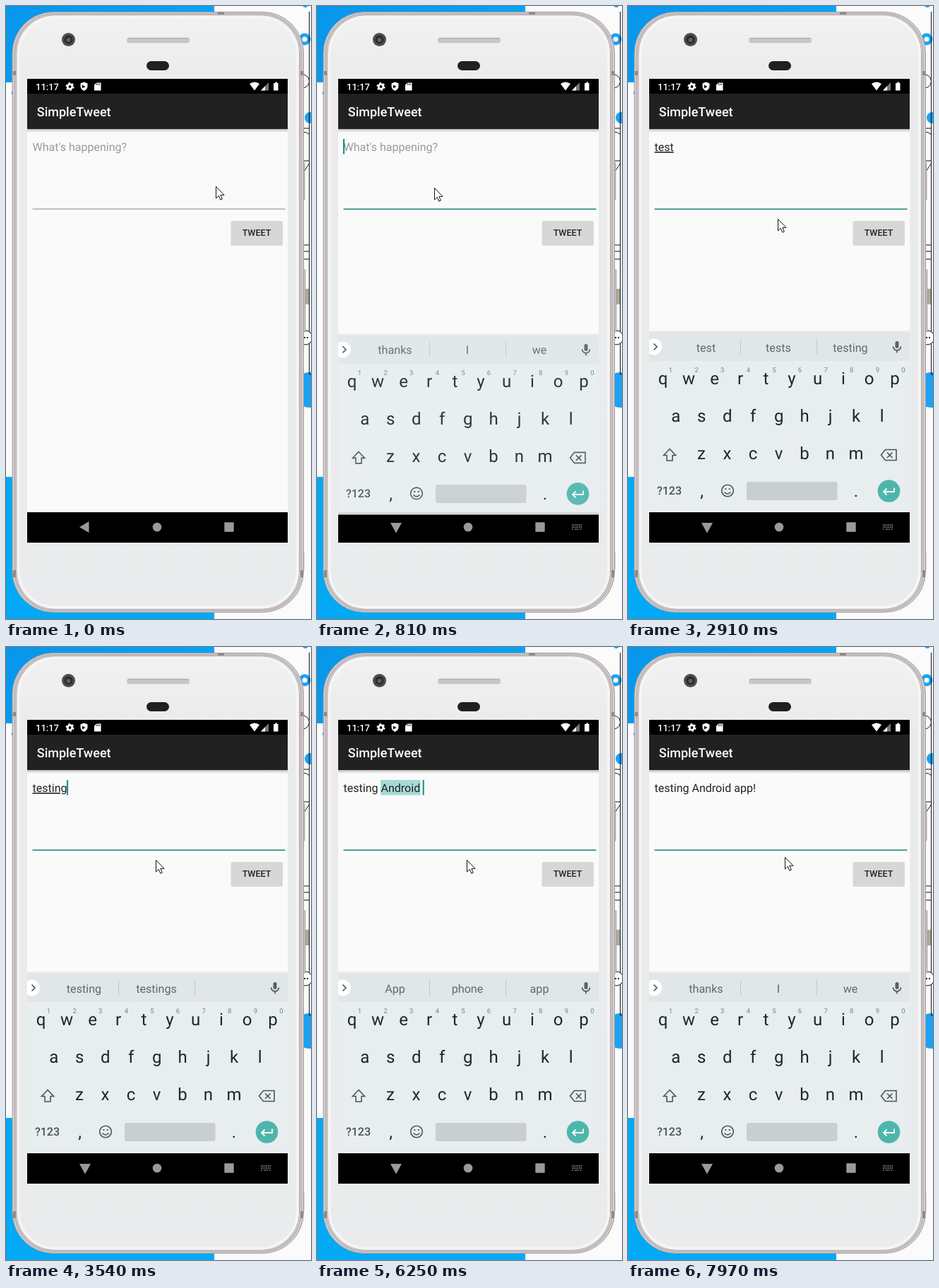
Animation, 432 px wide and 867 px high, one loop 8 s. Source, as an HTML page:

```html
<!DOCTYPE html>
<html lang="en">
<head>
<meta charset="utf-8">
<title>SimpleTweet</title>
<style>
html, body { margin: 0; height: 100%; overflow: hidden; background: #fbfbfb; }
svg { display: block; width: 100vw; height: 100vh; }
text { font-family: Roboto, sans-serif; white-space: pre; text-rendering: geometricPrecision; }
.med { font-weight: 500; }
.mid { text-anchor: middle; }
.key { font-size: 24px; fill: #18282f; }
.num { font-size: 9.5px; fill: #75838a; }
.word { font-size: 16.16px; fill: #5c6a71; }
.line { fill: none; stroke: #4a565c; stroke-width: 1.6; }
#mark { text-decoration: underline; }
</style>
</head>
<body>
<svg viewBox="0 0 432 867">
  <defs>
    <linearGradient id="sky" x2="1" y2=".3"><stop stop-color="#0896ea"/><stop offset="1" stop-color="#03a5f3"/></linearGradient>
    <linearGradient id="face" x2="0" y2="1"><stop stop-color="#f1f1f1"/><stop offset=".12" stop-color="#ebebeb"/><stop offset="1" stop-color="#e9ebec"/></linearGradient>
    <linearGradient id="shade" x2="0" y2="1"><stop stop-color="#bdbdbd"/><stop offset="1" stop-color="#fafafa"/></linearGradient>
    <linearGradient id="slot" x2="0" y2="1"><stop stop-color="#aeaeae"/><stop offset=".4" stop-color="#cbcbcb"/><stop offset="1" stop-color="#c2c2c2"/></linearGradient>
    <clipPath id="screen"><path d="M30 103H399V759H30Z"/></clipPath>
  </defs>

  <!-- desktop behind the phone -->
  <path d="M0 0H432V867H0Z" fill="#fbfbfb"/>
  <path d="M0 0H295V108H0Z" fill="url(#sky)"/>
  <path d="M0 666H295V867H0Z" fill="#03a9f4"/>
  <g fill="#1da1f2">
    <circle cx="10" cy="123" r="2.5"/><circle cx="423" cy="47" r="6" fill="#fff" stroke="#1da1f2" stroke-width="5"/>
    <circle cx="431" cy="158" r="8"/><circle cx="424" cy="-2" r="4"/><circle cx="430" cy="543" r="25"/>
  </g>
  <path d="M424 400H430V422H424Z" fill="#aaa99a"/>
  <path d="M429.500 8V521H432M420 97a9 9 0 0 1 0 19M420 173H430M420 178q6 0 10 4M420 219H430M420 237L430 222M420 338H430M420 347H430M420 358H430" fill="none" stroke="#111"/>
  <circle cx="424" cy="469" r="10" fill="#fff" stroke="#111"/>
  <path d="M422 469h7" stroke="#111" stroke-width="2" stroke-dasharray="2"/>

  <!-- phone body -->
  <path d="M420 222h3v52h-3zM420 373h4v88h-4zM420 772h2v25h-2z" fill="#c9c4c5" stroke="#8f8a8b" stroke-width=".6"/>
  <rect x="9" y="8.500" width="412.500" height="849" rx="58" fill="#d3cdcf" stroke="#a39c9e"/>
  <rect x="12.500" y="11" width="405.500" height="844" rx="56" fill="none" stroke="#b8b0b3" stroke-width="1.500"/>
  <rect x="15" y="13" width="400.500" height="840" rx="54" fill="url(#face)" stroke="#aaa3a5"/>
  <rect x="17.500" y="15.500" width="395.500" height="835" rx="52" fill="none" stroke="#f5f5f5" stroke-width="4"/>
  <path d="M10 92h4v6h-4zM417 92h4v6h-4zM10 798h4v10h-4zM417 798h4v10h-4zM300 9h9v3h-9z" fill="#8f898b"/>
  <circle cx="88.500" cy="47.500" r="9.500" fill="#4d4d4d"/>
  <circle cx="88.500" cy="47.500" r="6" fill="#292b2c"/>
  <circle cx="88.500" cy="48" r="3" fill="#5b6266"/>
  <rect x="171" y="44.800" width="89" height="7.500" rx="3.500" fill="url(#slot)"/>
  <rect x="199" y="78" width="32" height="13" rx="6.500" fill="#1f2022"/>

  <g clip-path="url(#screen)">
    <path d="M30 103H399V759H30Z" fill="#fafafa"/>
    <path d="M30 174H399V179H30Z" fill="url(#shade)"/>
    <path d="M30 103H399V124H30Z"/>
    <path d="M30 124H399V174H30Z" fill="#212121"/>
    <g fill="#fff">
      <text class="med" x="42" y="119" font-size="13">11:17</text>
      <circle cx="90.500" cy="114" r="3.300" fill="none" stroke="#fff" stroke-width="2.800"/>
      <circle cx="90.500" cy="114" r="5.200" fill="none" stroke="#fff" stroke-width="1.600" stroke-dasharray="2.700"/>
      <path d="M110.500 107.500l5 2v4q0 4-5 6.500q-5-2.500-5-6.500v-4zM128.500 108.500h6v11h-9.500v-8zM345 110q7-5 14 0l-7 9.500zM380 109h1.500v-1.500h2.500V109h1.500v10.500H379V109z"/>
      <path d="M372 108v11.500H361z" fill="#777"/><path d="M367 113.300v6.200h-6z"/>
      <text class="med" x="43.800" y="156.200" font-size="18">SimpleTweet</text>
    </g>
    <path d="M108 111.500v5l4.500-2.500z"/>
    <path d="M128.500 109.500v2.500m2-2.500v2.500m2-2.500v2.500" stroke="#000" stroke-width=".8"/>

    <rect id="select" x="90" y="188" height="21.500" fill="#a6dad5"/>
    <text id="ask" x="37.500" y="205" font-size="16.050" fill="#9a9a9a">What's happening?</text>
    <text id="field" x="37.500" y="205" font-size="16.050" fill="#222"><tspan id="done"></tspan><tspan id="mark"></tspan></text>
    <rect id="caret" y="188" width="2" height="21.500" fill="#009688"/>
    <rect id="rule" x="37.500" width="358"/>

    <rect x="318.500" y="304.500" width="73.500" height="34.500" rx="2" fill="#c2c2c2" opacity=".6"/>
    <rect x="319" y="304" width="72.500" height="34" rx="2" fill="#d6d7d7"/>
    <text class="med mid" x="355" y="325" font-size="12.570" fill="#212121">TWEET</text>

    <path d="M30 716H399V759H30Z"/>
    <g fill="#999">
      <path id="back"/>
      <circle cx="214" cy="737" r="6.300"/>
      <rect x="309.300" y="730.300" width="13.400" height="13.400" rx="1"/>
      <path id="ime" d="M361 734h14m-14 3h14m-14 3h2m2 0h6m2 0h2" stroke="#999" stroke-width="1.500" stroke-dasharray="1.500 1"/>
    </g>

    <g id="board">
      <path d="M30 459.500H399V462H30Z" fill="#e9e9e9"/>
      <path d="M30 462H399V502H30Z" fill="#e1e6e8"/>
      <path d="M30 502H399V715.500H30Z" fill="#e8edf0"/>
      <path d="M159.500 471V493M267.500 471V493" stroke="#c1c8cb"/>
      <circle cx="36.500" cy="482" r="11.500" fill="#fff"/>
      <path class="line" d="M36.500 477.500L41 482L36.500 486.500"/>
      <rect x="378.500" y="474" width="5" height="10" rx="2.500" fill="#566268"/>
      <path class="line" d="M375.500 481.500a5.500 5.500 0 0 0 11 0M381 487v3.500"/>
      <g id="words"></g>
      <g id="keys"></g>
      <path class="line" d="M59 626.500L50.500 635.500H55V643H63V635.500H67.500Z"/>
      <path class="line" d="M364.500 627.500H380V642.500H364.500L358.500 635ZM367 631.500L374.500 639M374.500 631.500L367 639"/>
      <text class="med mid" x="58.500" y="691" font-size="16" fill="#46545b">?123</text>
      <circle class="line" cx="141" cy="685.500" r="8.300"/>
      <path class="line" d="M136.500 687.500q4.500 5 9 0M137 683h2.500m3 0h2.500"/>
      <rect x="168" y="673" width="128.500" height="26" rx="3" fill="#c9ced1"/>
      <circle cx="369.500" cy="686" r="15.800" fill="#4db6ac"/>
      <path d="M377 681.500V687H362.500M366.500 682.500L362 687L366.500 691.500" fill="none" stroke="#fff" stroke-width="1.800"/>
    </g>
  </g>
  <path id="mouse" d="M.5.5V17L4.300 13.400L6.800 19.200L9.300 18.100L6.900 12.400H12Z" fill="#fff" stroke="#111"/>
</svg>
<script>
const LOOP = 8000, LEFT = 37.5;
const $ = id => document.getElementById(id);
const set = (el, attrs) => { for (const k in attrs) el.setAttribute(k, attrs[k]); };

function label(parent, cls, x, y, text) {
  const el = document.createElementNS("http://www.w3.org/2000/svg", "text");
  set(el, { class: cls + " mid", x, y });
  el.textContent = text;
  return parent.appendChild(el);
}

const keyRow = (letters, x, y) =>
  [...letters].forEach((c, i) => label($("keys"), "key", x + i * 36.5, y, c));
keyRow("qwertyuiop", 49.5, 535.2);
keyRow("asdfghjkl", 67.7, 587.7);
keyRow("zxcvbnm", 104, 640.9);
keyRow(",", 104.5, 694);
keyRow(".", 323, 694);
[..."1234567890"].forEach((c, i) => label($("keys"), "num", 60.5 + i * 36.6, 518, c));
const words = [110.5, 213, 315].map(x => label($("words"), "word", x, 488.5, ""));

const type = (done, mark, hints) => ({ done, mark, hints, caret: 1, select: 0 });
const on = { caret: 1 }, off = { caret: 0 };
const A = "testing ", B = A + "Android ";

// Each step changes part of the state from its time on.
const steps = [
  [0, { mouse: [297, 255], focus: 0, nav: 0, board: 0, drop: 0, ...type("", "", "thanks|I|we"), ...off }],
  [150, { mouse: [157, 270] }],
  [270, { mouse: [166, 257] }],
  [420, { focus: 1, ...on }],
  [670, { nav: 1 }],
  [810, { board: .92, drop: 3.9 }],
  [930, { board: 1, drop: 0, mouse: [212, 301] }],
  [1070, off],
  [1500, on],
  [2060, type("", "te", "te|the|test")],
  [2310, type("", "test", "test|tests|testing")],
  [2910, off],
  [3170, type("", "testi", "testi|testing|testify")],
  [3420, type("", "testin", "testin|testing|testings")],
  [3540, type("", "testing", "testing|testings|")],
  [3830, type(A, "", "process|the|and")],
  [3980, type(A, "a", "a|and|as")],
  [4130, type(A, "an", "an|and|and I")],
  [4270, type(A, "and", "and|Android|and I")],
  [4840, off],
  [5240, type(A, "andr", "andr|Android|android")],
  [5510, type(A, "andro", "andro|Android|android")],
  [5820, type(A, "androi", "androi|Android|Androids")],
  [5950, type(A, "android", "android|Android|Androids")],
  [6250, { ...type(B, "", "App|phone|app"), select: 1 }],
  [6400, type(B, "a", "a|and|app")],
  [6520, type(B, "ap", "ap|app|applied")],
  [6680, type(B, "app", "app|App|applied")],
  [7080, off],
  [7350, type(B + "app!", "", "thanks|I|we")],
  [7850, { ...off, mouse: [214, 299] }],
  [7970, { mouse: [222, 297] }]
];

let last;
function draw(now) {
  requestAnimationFrame(draw);
  const t = now % LOOP;
  const past = steps.filter(s => s[0] <= t);
  if (past.length === last) return;
  last = past.length;
  const s = Object.assign({}, ...past.map(p => p[1]));

  $("done").textContent = s.done;
  $("mark").textContent = s.mark;
  s.hints.split("|").forEach((w, i) => words[i].textContent = w);
  const width = s.done + s.mark ? $("field").getComputedTextLength() : 0;
  set($("caret"), { x: LEFT + width - .5, opacity: s.caret });
  set($("select"), { width: 56.5, opacity: s.select });
  set($("ask"), { opacity: s.done + s.mark ? 0 : 1 });
  set($("rule"), s.focus ? { y: 286.5, height: 1.6, fill: "#26877d" } : { y: 286.6, height: 1, fill: "#868686" });
  set($("back"), { d: s.nav ? "M104 731H120L112 745.500Z" : "M104 737L117.500 729V745Z" });
  set($("ime"), { opacity: s.nav });
  set($("board"), { opacity: s.board, transform: `translate(0 ${s.drop})` });
  set($("mouse"), { transform: `translate(${s.mouse})` });
}
requestAnimationFrame(draw);
</script>
</body>
</html>
```
